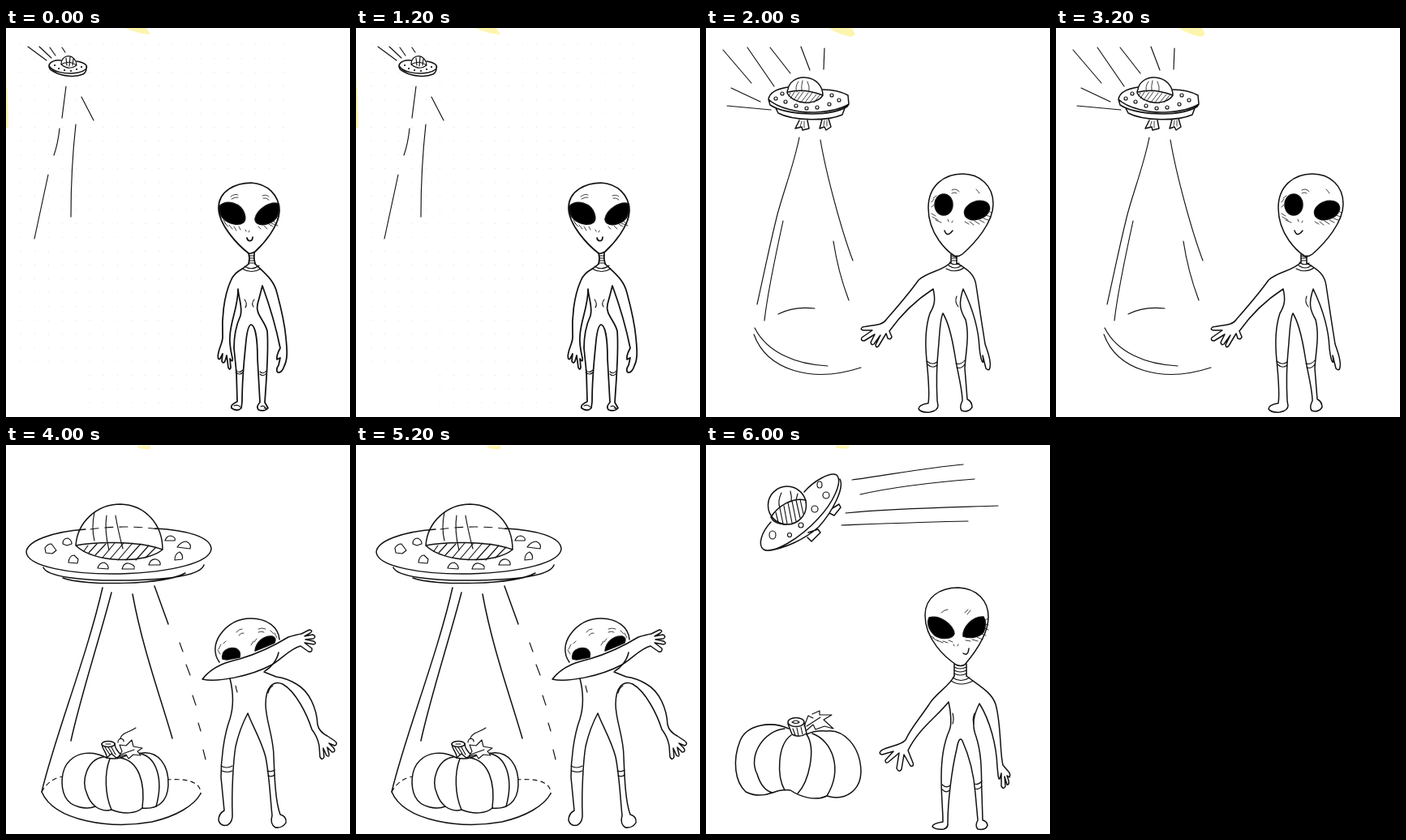
Animation of 424 by 480 pixels, one loop 8 s. Source, as an HTML page:

```html
<!DOCTYPE html>
<html lang="en">
<head>
<meta charset="utf-8">
<title>Alien visit</title>
<style>
html, body { margin: 0; width: 100%; height: 100%; overflow: hidden; background: #fff; }
svg { display: block; width: 100vw; height: 100vh; }
.scene { fill: none; stroke: #111; stroke-width: 1.5; stroke-linecap: round; stroke-linejoin: round; display: none; }
.thin { stroke-width: 1.15; }
.fine { stroke-width: .8; }
.bold { stroke-width: 1.75; }
.eye { fill: #000; }
.paper { fill: #fff; }
.glow { fill: #fdf5ae; stroke: none; }
.dots { fill: url(#grid); stroke: none; }
</style>
</head>
<body>
<svg viewBox="0 0 424 480">
<defs>
  <pattern id="grid" x="10" y="12" width="17" height="17" patternUnits="userSpaceOnUse">
    <circle cx="8.5" cy="8.5" r=".6" fill="#dcdcdc"/>
  </pattern>
</defs>

<!-- distant saucer -->
<g class="scene">
  <path class="dots" d="M10 12H350V182H248V476H95V420H10Z"/>
  <path class="glow" d="M147 0H173L178 8Q162 7 147 0ZM0 55Q3 90 3 122L0 124Z"/>
  <path class="thin" d="M27 23L50 40M41 23L56 37M54 24L61 34M69 24L73 30M74 72L69 111M66 124Q64 143 59 157M52 181L35 260M93 85L108 114M86 119C82 155 80 195 80 233"/>
  <path d="M68 40C60 39 54 42 53 46C55 54 75 58 89 55C97 53 101 50 99 46Q95 42 87 41M53 46Q52 51 59 54C70 60 86 61 95 57Q100 54 99 47"/>
  <path class="thin" d="M68 45C68 31 86 31 87 46Q78 53 68 45Q77 39 87 46M74 37L75 46M79 36L78 47M83 38L82 46"/>
  <path stroke-width="2.2" d="M60 46h.1M65 50h.1M72 52h.1M80 53h.1M87 51h.1M93 48h.1"/>
  <g class="bold">
    <path d="M299 278C286 268 262 243 262 222C262 201 283 191 302 191C322 192 337 206 337 226C336 245 318 266 307 276Q302 279 299 278"/>
    <path class="eye" d="M263 220C272 211 290 216 294 230C297 240 290 243 282 242C270 240 262 232 263 220ZM336 217C326 213 309 224 307 236C308 243 316 244 324 241C334 237 338 228 336 217Z"/>
    <path d="M297 259C298 264 304 264 304 258M299 278Q301 284 299 291M306 277Q305 284 307 291"/>
    <path d="M299 291C292 299 282 299 277 312C268 332 266 360 267 378C268 387 264 391 262 400C260 407 262 410 264 408L267 402L266 411Q268 415 270 411L272 404L274 419Q276 423 277 419L276 408Q280 414 279 407C277 398 275 390 276 380C277 360 286 345 286 322C287 335 292 345 289 355C283 368 281 380 281 395L284 425L285 461Q276 465 278 469Q285 474 290 469L291 461C291 430 294 405 296 385Q298 367 302 366C308 367 310 388 310 408L313 462Q308 467 311 471Q318 474 323 469L319 462C321 430 324 400 322 374C319 361 307 353 310 341Q313 330 316 318C324 340 332 365 338 395Q333 404 334 409L338 407L336 416Q332 422 335 425Q340 426 343 417C348 407 346 394 345 382C343 360 338 342 334 327C330 310 318 302 307 291"/>
  </g>
  <path class="fine" d="M277 208q5-4 9-2M278 211q5-3 8-2M316 207q5-2 8 1M317 210q4-1 7 2M295 249l1 2M300 250l-1 2M270 241l4 4M275 243l4 5M281 245l3 5M287 245l2 4M311 245l3 3M318 244l4 4M324 242l5 3M329 238l5 4M327 241l8 3M332 233l4 4M268 237l3 5"/>
  <path class="thin" d="M299 281h7M300 284h6M299 287h7M299 290h8M294 294Q303 300 312 293M291 297Q303 304 314 297M294 335q4 5 1 10M306 335q-4 5-1 9M283 422Q287 427 292 422M283 425Q288 429 292 425M313 424q4 4 8-1M313 427q4 4 8-1M281 466q5-2 8 2M314 467q5-2 6 3M318 469h3"/>
</g>

<!-- saucer close by -->
<g class="scene">
  <path class="dots" d="M112 130H240V300H112Z" opacity=".45"/>
  <path class="glow" d="M151 0H180L184 8L179 11Q164 8 151 0Z"/>
  <path class="thin" d="M21 27L56 68M51 24L84 72M79 24L104 56M117 23L128 52M146 25L145 51M31 74L67 91M26 96L80 101"/>
  <path class="thin" d="M115 135C108 170 96 200 88 230C78 270 70 310 63 341M95 238C88 270 76 325 72 361M141 138C148 180 167 250 181 287M157 263C161 290 170 320 176 336M89 353Q108 343 134 346M60 370C75 400 110 415 150 417M59 378C75 422 130 439 191 419"/>
  <path d="M101 76C102 67 112 60 122 61C136 62 144 72 144 83C135 97 107 94 100 80Q100 77 101 76M101 79Q121 74 144 83"/>
  <path d="M101 73C88 75 78 80 77 88C88 99 115 105 135 104C153 103 168 99 176 94L175 83Q162 76 144 76M77 88L79 95C98 107 150 111 174 97L176 94M86 99L89 105C108 115 150 115 168 107L171 99M115 114L110 124L118 122L119 126L127 124L125 114M143 113L140 124L146 122L148 126L154 122L151 112"/>
  <path class="fine" d="M104 80l-2 4M109 79l-5 8M115 79l-7 10M120 79l-8 11M126 80l-9 12M131 80l-9 12M136 82l-9 11M140 83l-7 9M114 66Q109 73 112 79M119 65Q117 72 118 78M125 66Q128 72 127 78M118 115l-2 7M121 115v8M146 114l-1 7M149 114v7"/>
  <g class="thin">
    <circle cx="94" cy="81" r="2"/><circle cx="98" cy="91" r="2"/><circle cx="111" cy="96" r="2"/>
    <circle cx="124" cy="99" r="2"/><circle cx="137" cy="98" r="2"/><circle cx="152" cy="94" r="2"/>
    <circle cx="164" cy="89" r="2"/><circle cx="155" cy="83" r="2"/><circle cx="86" cy="87" r="2"/>
  </g>
  <path d="M306 281C298 276 274 255 274 222C274 195 293 180 316 180C338 180 354 195 354 217C354 240 332 265 316 279Q311 283 306 281"/>
  <ellipse class="eye" cx="293" cy="218" rx="11" ry="13"/>
  <ellipse class="eye" cx="334" cy="225" rx="16" ry="11" transform="rotate(-20 334 225)"/>
  <path d="M294 250Q297 259 304 250M302 279V289M309 281V290"/>
  <path d="M302 289C292 300 274 300 262 311C250 328 235 345 222 360C217 368 204 366 193 369Q189 372 194 373L205 373L192 382Q190 386 195 386L208 378L203 388Q204 392 207 390L215 379L209 391Q210 396 213 392L222 377L224 383Q228 385 229 381L226 374C243 350 260 335 280 322C283 335 282 342 276 352C270 370 270 390 272 410C274 430 276 450 274 463Q262 465 262 470Q265 475 276 474Q286 472 286 466L285 460C284 440 284 420 286 400C288 380 288 360 292 352C297 360 303 380 307 405C310 425 316 445 316 460Q312 468 315 472Q323 475 328 468Q328 461 322 458L319 420C320 400 325 380 320 360C313 348 311 340 317 322C328 345 336 370 337 395C338 405 340 414 342 412L341 404L345 420Q349 424 350 419C352 410 347 399 344 390C340 365 337 345 333 318C331 302 320 297 309 290"/>
  <path class="fine" d="M303 200q5-3 9 2M333 199q3 3 4 5M303 204q4-2 6 0M298 236l1 3M304 238l-1 2M278 229l5 3M279 233l7 4M283 237l7 3M319 239l5 3M325 239l5 4M331 238l6 4M337 237l6 3M342 235l6 2M345 231l6 2M348 226l4 2M281 211l-3 4M281 218l-3 3M284 207l-4 3"/>
  <path class="thin" d="M302 281l7 2M302 284h7M302 287h7M300 289Q306 294 312 290M299 293Q307 299 315 293M296 297Q307 303 318 296M309 331Q306 338 311 344M272 411q7 6 13 1M273 415q6 6 12 1M308 414q6 2 11-4M309 419q6 2 10-4"/>
</g>

<!-- pumpkin in the beam -->
<g class="scene">
  <path class="dots" d="M18 182H130V352H18Z" opacity=".4"/>
  <path class="glow" d="M162 1H178V5Q168 6 162 3Z"/>
  <path d="M98 104C55 107 26 119 25 132C26 150 80 160 140 159C205 157 252 145 253 128C252 113 222 105 184 103M46 151C50 162 90 168 150 167C205 166 240 160 244 148M70 164C95 174 195 173 221 158"/>
  <path d="M86 124C88 95 112 73 141 73C172 74 193 98 193 129C172 147 108 146 86 124C105 120 160 117 193 129"/>
  <path class="thin" stroke-dasharray="10 8" d="M104 104Q145 98 189 104"/>
  <path class="thin" d="M109 83Q105 102 109 118M124 87Q121 105 127 130M135 87Q138 105 144 128M101 124l-5 7M112 122l-10 11M123 122l-13 14M134 121l-15 18M145 121l-17 20M156 121l-18 21M166 122l-18 20M176 124l-16 18M185 126l-13 13"/>
  <path class="thin" d="M70 122Q70 115 76 115Q81 117 81 122L75 124ZM49 133L48 127Q51 122 56 122L62 130L57 134ZM77 145Q78 136 84 136L89 141L88 146ZM113 152Q115 145 121 145Q127 148 126 153ZM143 153Q145 145 151 146Q160 148 158 153ZM176 148Q178 140 185 141Q191 143 190 148ZM208 142Q208 134 214 132Q219 136 217 141ZM211 126Q216 119 222 119Q229 122 227 128ZM196 118Q198 112 203 112Q210 114 208 118Z"/>
  <path d="M119 176C100 260 60 360 44 428C60 465 130 474 180 465C210 458 232 445 240 430M130 182C115 240 92 310 80 365M156 184C168 250 190 310 205 362M183 174L200 221"/>
  <path class="thin" d="M214 244l4 11M222 271l5 13M230 309l4 12M237 343l3 10M243 376l3 12"/>
  <path class="thin" stroke-dasharray="5 5" d="M44 428Q53 412 70 409M198 413Q240 410 240 430"/>
  <path class="paper" d="M124 386C106 376 88 380 79 389C67 400 67 422 73 434C80 448 100 450 110 446Q120 453 130 450C145 456 160 455 168 448C187 450 199 440 200 420C201 395 188 378 168 380Q152 381 141 386Q133 388 124 386"/>
  <path d="M120 385C100 388 92 414 100 431Q103 440 110 446M128 387C121 405 122 432 130 450M141 386C163 390 172 415 168 448M166 381C184 385 195 410 185 446"/>
  <path class="paper" d="M118 369C119 377 125 380 124 386L130 381L136 386L143 383Q134 376 134 368"/>
  <ellipse cx="126" cy="369" rx="8" ry="3.5"/>
  <path class="thin" d="M122 373l6 9M126 373l5 8M130 373l5 9M123 369h6M138 367C138 360 146 362 145 366M141 362C143 355 151 355 160 349"/>
  <path class="paper thin" d="M139 384L143 378L140 370L148 371L155 364L157 372L168 374L162 378L166 383L157 382L151 387L148 382ZM141 382L158 376"/>
  <path d="M263 268C255 257 257 244 264 234C274 220 288 214 302 214C322 214 336 225 337 240M336 256C334 266 326 275 319 279"/>
  <path class="eye" d="M267 264C265 254 274 249 283 251Q290 254 288 262L272 265ZM307 254C308 243 318 235 328 236Q334 238 331 244Q320 249 307 254Z"/>
  <path d="M242 289C255 272 275 267 288 264C315 256 335 245 348 237Q358 234 364 233L374 228Q379 229 375 232L368 236L378 234Q383 236 379 239L369 240L379 242Q384 245 379 246L368 244L377 251Q378 256 373 255L363 248C351 251 342 262 328 271C300 286 260 293 242 289"/>
  <path d="M276 288C281 308 280 325 276 338C268 360 265 390 265 410L269 451Q262 455 262 463Q264 471 273 469Q280 465 279 454C278 430 280 390 283 372Q288 350 298 331C303 345 315 365 320 385C325 410 326 440 328 457Q325 468 332 472Q341 473 345 466Q346 458 338 456C332 440 331 410 330 385C330 360 320 340 320 320C320 298 330 290 341 295C357 304 371 332 377 351Q384 360 386 371L387 385Q390 390 392 385L391 374L395 383Q399 386 398 381L396 373L402 379Q407 379 404 374L398 368L405 371Q410 369 405 365L396 359Q386 354 384 345C383 325 374 304 358 295Q347 288 333 286L318 280"/>
  <path class="fine" d="M284 231q3-4 7-4M287 235q3-4 6-3M311 227q5-2 9 0M311 231q4-2 7 0M262 252l3-6M264 258l-3-5M268 245l3-3M330 233l-4-4M334 238l-3-6M302 247l3-5M306 243l3-4"/>
  <path class="thin" d="M283 297q1 5 2 8M323 306q2-7 6-9M265 396q7 4 14 0M266 402q7 3 13 0M322 402q5 2 9-1M323 408q5 2 8-1"/>
</g>

<!-- saucer flies off -->
<g class="scene">
  <path class="dots" d="M18 182H215V302H18Z" opacity=".4"/>
  <path class="glow" d="M160 1H176V4Q166 6 160 3Z"/>
  <path class="thin" d="M180 43C220 38 270 28 317 24M190 61C230 52 280 46 331 42M172 84C230 78 300 77 360 75M167 99C220 97 270 95 323 94"/>
  <path d="M121 58C133 44 153 33 161 37C169 45 157 71 138 91C116 115 83 135 71 129C63 123 69 107 80 95M165 42C171 53 156 82 139 101C121 117 96 128 77 130M156 78L164 73L166 77L158 87L152 84M126 108L138 104L141 108L130 119L125 114"/>
  <circle class="paper" cx="100" cy="74.5" r="23.5"/>
  <path d="M80 89C88 76 106 64 123 68M80 89Q84 98 99 98"/>
  <path class="thin" d="M86 83L89 95M91 78L95 97M96 75L100 97M101 71L106 96M106 69L111 94M111 68L116 90M116 67L120 85M93 59Q88 69 91 78M104 57Q106 64 105 70M113 60L111 68"/>
  <g class="thin">
    <ellipse cx="140" cy="49" rx="3" ry="4"/><circle cx="148" cy="62" r="4"/><circle cx="134" cy="79" r="4"/>
    <circle cx="117" cy="99" r="3"/><circle cx="103" cy="111" r="2.5"/><ellipse cx="82" cy="111" rx="4" ry="5"/>
  </g>
  <path d="M102 350C80 340 50 345 42 365C32 390 36 416 49 428C61 434 74 432 82 429Q93 424 104 426C116 434 134 440 149 433C172 440 191 426 191 402C190 372 170 350 148 353Q134 352 124 357"/>
  <path d="M97 350C72 352 51 383 63 406Q69 426 82 429M105 358C88 370 87 408 97 426M124 357C136 375 127 415 113 430M131 356C156 365 169 400 149 433"/>
  <path class="paper" d="M101 344L106 357Q115 362 124 356L121 343"/>
  <ellipse class="paper" cx="111" cy="342" rx="10" ry="5.5"/>
  <path class="thin" d="M106 342q5-4 9 0q-4 3-9 0M107 350l3 8M112 349l2 10M117 348l2 9"/>
  <path class="thin" d="M121 347L126 334L132 337M131 332L140 328L140 333L155 333L145 339L157 350L146 347L135 351L132 345L124 352M124 347L141 336"/>
  <path d="M308 271C295 262 270 240 270 210C270 188 288 176 311 176C335 177 348 193 348 212C348 235 330 258 319 271Q314 274 308 271"/>
  <path class="eye" d="M275 213C288 209 305 222 306 233C303 240 290 240 282 235C275 228 272 220 275 213ZM342 212C329 211 316 225 317 236C325 239 336 238 342 231C345 224 345 217 342 212Z"/>
  <path d="M317 257Q323 261 324 251M306 270V285M321 270V285"/>
  <path d="M306 285C300 298 283 306 275 320C263 338 252 350 246 364C240 371 226 371 216 377Q212 381 217 382L231 378L221 389Q221 394 225 391L238 380L235 399Q238 405 241 400L244 382L252 396Q257 397 255 392L249 377C262 350 285 335 299 317C302 330 303 345 300 352C292 370 290 390 290 410C290 435 292 450 292 465Q279 467 279 471Q283 475 293 474Q299 472 298 466C298 440 303 400 309 375Q312 358 316 365C325 385 330 405 332 430L335 463Q331 470 335 474Q345 476 347 469Q346 464 341 463L340 430C339 410 341 385 333 360C327 345 330 333 337 319C350 340 358 370 359 397C360 406 360 413 362 412L364 405L364 421Q367 426 369 421L368 409L371 419Q374 420 373 414L371 408L374 410Q376 406 372 402L366 395C362 380 364 345 357 320C352 305 338 298 321 285"/>
  <path class="fine" d="M290 207q4-4 8-4M319 207l4-4M322 209l4-5M305 246l1 2M311 246l-1 2M276 235l5 3M279 238l7 4M285 241l7 3M292 242l6 2M299 241l5 2M320 241l6 1M328 240l7 2M334 237l7 3M339 233l6 2M343 226l5 2M344 221l4 1M344 216l4-2"/>
  <path class="thin" d="M306 274q7 4 15 0M306 278q7 4 15 0M306 282q7 4 15 0M304 287Q314 294 325 287M302 291Q314 299 329 291M304 331q2 8 0 13M331 331q-3 7-1 13M291 419q5 5 10 1M291 425q5 5 9 1M331 418q4 2 9-3M332 424q4 2 8-3"/>
</g>
</svg>
<script>
const HOLD = 2000;
const scenes = [...document.querySelectorAll('.scene')];
const start = performance.now();

function draw(now) {
  const current = Math.floor(Math.max(0, now - start) / HOLD) % scenes.length;
  scenes.forEach((scene, i) => { scene.style.display = i === current ? 'inline' : 'none'; });
  requestAnimationFrame(draw);
}
draw(start);
</script>
</body>
</html>
```
